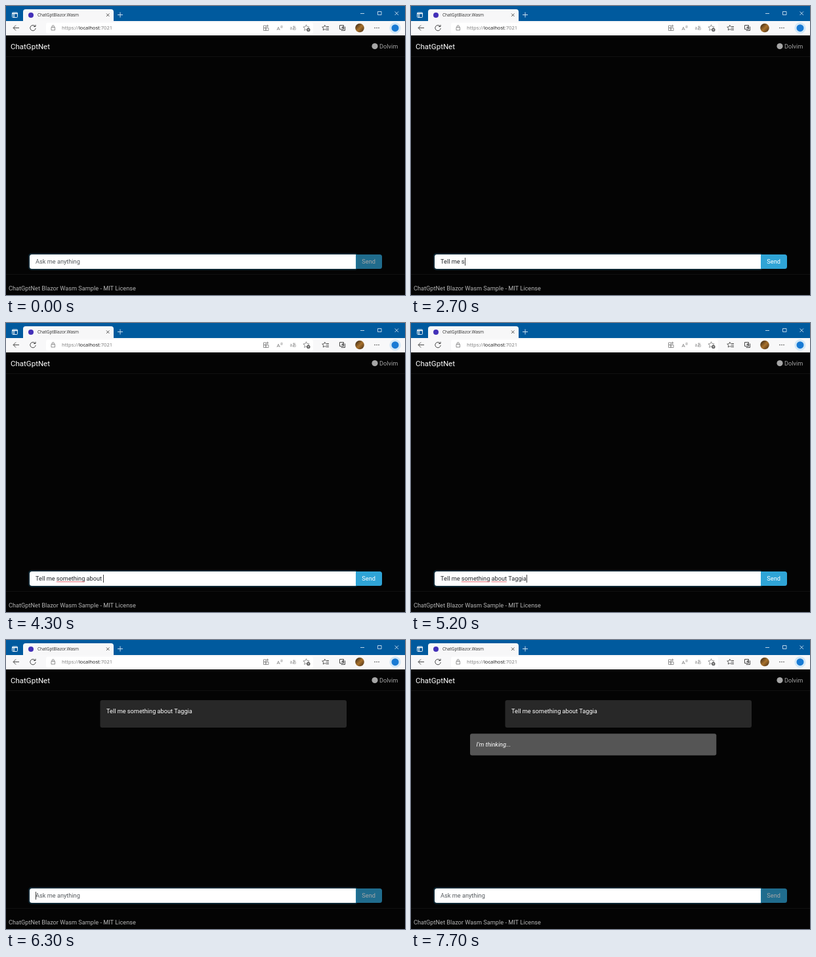
Write an HTML page with a canvas that moves like this. It is 608 px wide and 442 px high and loops after 8 s.

```html
<!DOCTYPE html>
<html lang="en">
<head>
<meta charset="utf-8">
<title>Chat sample</title>
<style>
html, body { margin: 0; width: 608px; height: 442px; overflow: hidden; background: #040404; }
canvas { display: block; }
</style>
</head>
<body>
<canvas id="stage" width="608" height="442"></canvas>
<script>
const ctx = document.getElementById('stage').getContext('2d');
const LOOP = 8000;
const UI = '"Open Sans", sans-serif';
const BODY = '9.2px Roboto, sans-serif';
const PROMPT = 'Tell me something about Taggia';

// [time in ms, number of characters typed]
const KEYS = [
  [1300, 1], [1400, 2], [1600, 3], [1700, 4], [1900, 5], [2000, 6], [2100, 7], [2200, 8],
  [2700, 9], [2800, 10], [3000, 11], [3300, 13], [3400, 15], [3600, 16], [3700, 17],
  [3800, 19], [4100, 20], [4200, 22], [4300, 24], [4600, 25], [4700, 26], [4800, 27],
  [5100, 29], [5200, 30]
];
const SENT = 5800, REPLY = 6600;
const CARET_ON = [[200, 700], [1000, 1300], [6300, 6800], [7100, 7700]];

function rect(x, y, w, h, fill, radius = 0) {
  ctx.fillStyle = fill;
  ctx.beginPath();
  ctx.roundRect(x, y, w, h, radius);
  ctx.fill();
}

function text(str, x, y, color, font = BODY) {
  ctx.font = font;
  ctx.fillStyle = color;
  ctx.fillText(str, x, y);
  return ctx.measureText(str).width;
}

function widthOf(str) {
  ctx.font = BODY;
  return ctx.measureText(str).width;
}

function stroke(d, color, width = 0.9) {
  ctx.strokeStyle = color;
  ctx.lineWidth = width;
  ctx.stroke(new Path2D(d));
}

function disc(x, y, r, fill) {
  ctx.fillStyle = fill;
  ctx.beginPath();
  ctx.arc(x, y, r, 0, Math.PI * 2);
  ctx.fill();
}

function star(cx, cy, r, color) {
  let d = '';
  for (let i = 0; i < 10; i++) {
    const a = i * Math.PI / 5 - Math.PI / 2;
    const k = i % 2 ? r * 0.48 : r;
    d += (i ? 'L' : 'M') + (cx + k * Math.cos(a)) + ' ' + (cy + k * Math.sin(a));
  }
  stroke(d + 'Z', color, 0.8);
}

function drawTitleBar() {
  rect(0, 0, 608, 24, '#005a9e');
  stroke('M10.5 10h6a1 1 0 0 1 1 1v5.500a1 1 0 0 1-1 1h-6a1 1 0 0 1-1-1V11a1 1 0 0 1 1-1Z', '#fff', 0.9);
  stroke('M9.500 11.500h8M12 11.500v6', '#fff', 1.3);
  rect(26, 5, 138, 20, '#f7f7f8', [4, 4, 0, 0]);
  disc(38, 14, 4, '#4330b8');
  text('ChatGptBlazor.Wasm', 48, 16.2, '#2a2a2a', '6.4px ' + UI);
  stroke('M153 11.500l4.500 4.500M157.500 11.500l-4.500 4.500', '#333', 0.8);
  stroke('M170 13.500h8M174 9.500v8', '#dcebf6', 0.9);
  stroke('M540 11.500h6M566.500 8.500h5.500v5h-5.500ZM592.500 8.500l5.500 5.500M598 8.500l-5.500 5.500', '#e8f2f9', 0.8);
}

function drawToolbar() {
  const dark = '#333', gray = '#777';
  rect(0, 23, 608, 22, '#f8f8f9');
  rect(61, 25.5, 407, 17, '#fff', 3);
  stroke('M20 33.500H11.500M15 29.500l-4 4l4 4', dark);
  stroke('M44.500 31.200A4.200 4.200 0 1 0 45.200 34M45 28.800V31.500H42', dark);
  stroke('M69 32.500h5.500v4.500h-5.500ZM70.200 32.500v-1.500a1.500 1.500 0 0 1 3 0v1.500', gray, 0.8);

  const font = '7.6px ' + UI;
  let x = 85;
  x += text('https://', x, 36.3, '#777', font);
  x += text('localhost', x, 36.3, '#111', font);
  text(':7021', x, 36.3, '#777', font);

  stroke('M392.500 30h3.500v3.500h-3.500ZM392.500 33.500h3.500v4h-3.500ZM396 33.500h4v4h-4ZM398.300 28.500v4M396.300 30.500h4', gray, 0.8);
  text('A', 412.5, 37, gray, '8px ' + UI);
  stroke('M418.500 30.500q1.500 1 0 2.500M420 29.500q2 2 0 4.500', gray, 0.7);
  text('aあ', 432.5, 36.3, gray, '6.3px "Noto Sans CJK JP", "Noto Sans CJK", sans-serif');
  star(457.5, 33.5, 4.8, gray);
  disc(460.8, 36.4, 2.7, '#555');
  stroke('M459.300 36.400h3M460.800 34.900v3', '#fff', 0.6);
  star(485.8, 33.5, 4.3, dark);
  rect(487.5, 30.5, 5.5, 8, '#f8f8f9');
  stroke('M488 31.500h4M488 34h4M488 36.500h4', dark, 0.9);
  stroke('M508.500 29.500h6v6h-6ZM510.500 37.500h6v-6M513 31v3.500M511.200 32.700h3.500', dark, 0.9);

  const photo = ctx.createLinearGradient(533, 28, 545, 40);
  photo.addColorStop(0, '#3c2b18');
  photo.addColorStop(0.5, '#a8712c');
  photo.addColorStop(1, '#4a3118');
  disc(539, 33.5, 6.8, photo);
  for (const dx of [-3, 0, 3]) disc(565 + dx, 33.5, 0.75, dark);
  disc(593, 33.7, 8.6, '#d3e8f7');
  disc(593, 33.7, 5.5, '#187ad4');
}

function drawPage() {
  rect(0, 45, 608, 397, '#040404');
  rect(0, 77, 608, 1, '#111');
  rect(0, 410, 608, 1, '#111');
  text('ChatGptNet', 7, 65.5, '#fff', '11.5px Roboto, sans-serif');
  disc(562, 61.5, 4.6, '#a6a6a6');
  text('Dolvim', 569, 65, '#a6a6a6');
  text('ChatGptNet Blazor Wasm Sample - MIT License', 4, 435, '#b4b4b4');
}

function drawMessages(t) {
  if (t >= SENT) {
    rect(143.5, 92, 375.5, 42, '#282828', 3);
    text(PROMPT, 153, 111.7, '#fff');
  }
  if (t >= REPLY) {
    rect(90, 143.3, 375.3, 33.2, '#555', 3);
    text("I'm thinking...", 99.5, 163, '#fff', 'italic ' + BODY);
  }
}

function squiggle(before, word) {
  const start = 45 + widthOf(before);
  const end = start + widthOf(word);
  let d = `M${start} 396.3`;
  for (let x = start + 1, up = true; x < end; x++, up = !up) d += `L${x} ${up ? 395.2 : 396.3}`;
  stroke(d, '#e0424c', 0.8);
}

function drawForm(t) {
  const enabled = t >= KEYS[0][0] && t < SENT;
  const level = enabled ? 1 : t >= SENT ? Math.max(0.65, 0.8 - (t - SENT) / 1000) : 0.65;
  const shade = (r, g, b) => `rgb(${[r, g, b].map(v => Math.round(v * level + 4 * (1 - level)))})`;
  rect(533, 380, 40, 22, shade(47, 164, 214), [0, 3.5, 3.5, 0]);
  text('Send', 542.3, 394, shade(255, 255, 255));
  rect(34, 378, 500.5, 26, 'rgba(42,159,214,0.22)', [5, 2, 2, 5]);
  rect(36, 380, 497, 22, '#fff', [3.5, 0, 0, 3.5]);

  let typed = '';
  if (enabled) {
    for (const [at, count] of KEYS) if (t >= at) typed = PROMPT.slice(0, count);
    text(typed, 45, 394, '#212529');
    if (t >= 3800) squiggle('Tell me ', 'something');
    if (t >= 4500) squiggle('Tell me something ', 'about');
  } else {
    text('Ask me anything', 45, 394, '#555a5e');
  }
  if (enabled || CARET_ON.some(([on, off]) => t >= on && t < off)) {
    rect(Math.round(45 + widthOf(typed)), 385, 0.8, 12, '#111');
  }
}

function frame() {
  const t = Math.floor(performance.now() % LOOP / 100) * 100;
  drawPage();
  drawTitleBar();
  drawToolbar();
  drawMessages(t);
  drawForm(t);
  requestAnimationFrame(frame);
}
frame();
</script>
</body>
</html>
```
